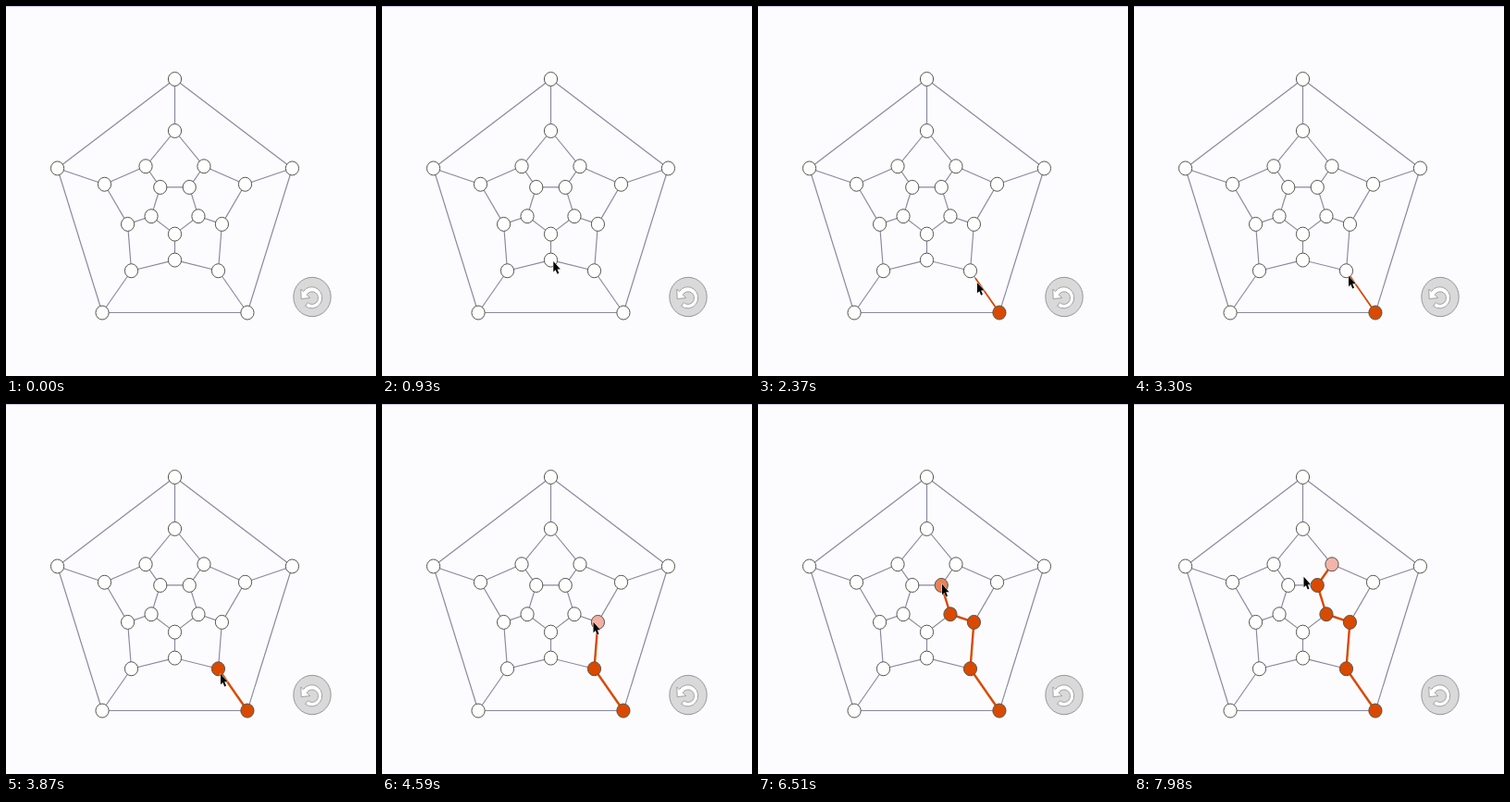
These frames come from a looping animation (400x400 px, 8 s). An HTML page:

```html
<!DOCTYPE html>
<html lang="en">
<head>
<meta charset="utf-8">
<title>Graph path</title>
<style>
html, body { margin: 0; width: 100%; height: 100%; overflow: hidden; background: #fcfcff; }
svg { display: block; width: 100vw; height: 100vh; }
.edge { stroke: #88889f; stroke-width: 1.15; }
.trail { stroke: #d94a00; }
.node { fill: #fff; stroke: #55554a; stroke-width: 1; }
</style>
</head>
<body>
<svg viewBox="0 0 400 400">
  <rect width="400" height="1" fill="#ccccfa"/>
  <g id="edges"></g>
  <g id="trails"></g>
  <g id="nodes"></g>
  <g stroke-linejoin="round">
    <ellipse cx="331" cy="314.5" rx="20.2" ry="21.2" fill="#d9d9da" stroke="#96969a"/>
    <path id="icon" d="M318.8 306L321.4 308.6A11.2 11.6 0 1 1 323.6 324.4L326.4 320.6A6.6 6.8 0 1 0 325.2 312.2L328.8 315.6L319.2 316.6Z" fill="#fff" stroke="#98989c" stroke-width=".9"/>
  </g>
  <path id="cursor" d="M0 0V12.6L2.8 10.1L5 15L7.1 14L4.9 9.3H8.9Z" fill="#000" stroke="#fff" paint-order="stroke"/>
</svg>
<script>
const LOOP = 8000, CX = 182.5, CY = 218.6, SQUEEZE = 0.956;
const $ = id => document.getElementById(id);

function add(parent, tag, attrs) {
  const el = document.createElementNS('http://www.w3.org/2000/svg', tag);
  for (const k in attrs) el.setAttribute(k, attrs[k]);
  return parent.appendChild(el);
}

// Five nodes on a ring, clockwise from the given angle
const ring = (r, deg) => Array.from({ length: 5 }, (_, i) => {
  const a = (deg + 72 * i) * Math.PI / 180;
  return { x: CX + r * SQUEEZE * Math.sin(a), y: CY - r * Math.cos(a) };
});
const outer = ring(139.6, 0), spoke = ring(83.6, 0);
const mid = ring(56, 36), inner = ring(28, 36);

const line = (g, cls, a, b) =>
  add($(g), 'line', { class: cls, x1: a.x, y1: a.y, x2: b.x, y2: b.y });

for (let i = 0; i < 5; i++) {
  const n = (i + 1) % 5;
  [[outer[i], outer[n]], [outer[i], spoke[i]], [spoke[i], mid[i]],
   [mid[i], spoke[n]], [mid[i], inner[i]], [inner[i], inner[n]]]
    .forEach(([a, b]) => line('edges', 'edge', a, b));
}
for (const p of [...outer, ...spoke, ...mid, ...inner])
  p.el = add($('nodes'), 'ellipse', { class: 'node', cx: p.x, cy: p.y, rx: 7.1, ry: 7.5 });

// Pointer legs in order; those with a node end on it
const ENTER = 360, entry = { x: 311, y: 378 };
const legs = [
  { from: ENTER, to: 690, x: 139, y: 240 },
  { from: 840, to: 1830, x: 260, y: 332, node: outer[2] },
  { from: 1980, to: 3310, x: 232, y: 291, node: spoke[2] },
  { from: 4350, to: 4440, x: 228.5, y: 235, node: mid[1] },
  { from: 4830, to: 5400, x: 208, y: 224, node: inner[1] },
  { from: 5700, to: 6230, x: 199, y: 194, node: inner[0] },
  { from: 6600, to: 6800, x: 213, y: 178, node: mid[0] },
  { from: 7800, to: 7980, x: 183.5, y: 186 }
];
const stops = legs.filter(l => l.node);
const trails = stops.slice(1).map((s, i) => ({
  el: line('trails', 'trail', stops[i].node, s.node), a: stops[i].node, b: s.node, leg: s
}));

const ramp = (t, a, b) => Math.max(0, Math.min(1, (t - a) / (b - a)));
const lerp = (a, b, k) => a + (b - a) * k;
const progress = (leg, t) => 1 - (1 - ramp(t, leg.from, leg.to)) ** 5;

const WHITE = [255, 255, 255], PINK = [243, 180, 170], ORANGE = [217, 74, 0];
const mix = (a, b, k) => a.map((v, i) => lerp(v, b[i], k));
const HOVER = 140, FILL = 300;

function draw(t) {
  stops.forEach((s, i) => {
    const lit = s.to + HOVER;
    let color = mix(WHITE, PINK, ramp(t, s.to, lit));
    if (i < stops.length - 1) color = mix(color, ORANGE, ramp(t, lit, lit + FILL));
    s.node.el.style.fill = `rgb(${color.map(Math.round)})`;
  });
  for (const { el, a, b, leg } of trails) {
    const k = progress(leg, t);
    el.setAttribute('x2', lerp(a.x, b.x, k));
    el.setAttribute('y2', lerp(a.y, b.y, k));
    el.style.strokeWidth = t < leg.to ? 1.7 : 2.4;
    el.style.display = k > 0 ? '' : 'none';
  }
  let { x, y } = entry;
  for (const leg of legs) {
    const k = progress(leg, t);
    x = lerp(x, leg.x, k);
    y = lerp(y, leg.y, k);
  }
  $('cursor').style.display = t < ENTER ? 'none' : '';
  $('cursor').setAttribute('transform', `translate(${x} ${y + 0.7}) scale(.85 .92)`);
}

const start = performance.now();
function tick() {
  draw((performance.now() - start) % LOOP);
  requestAnimationFrame(tick);
}
tick();
</script>
</body>
</html>
```
